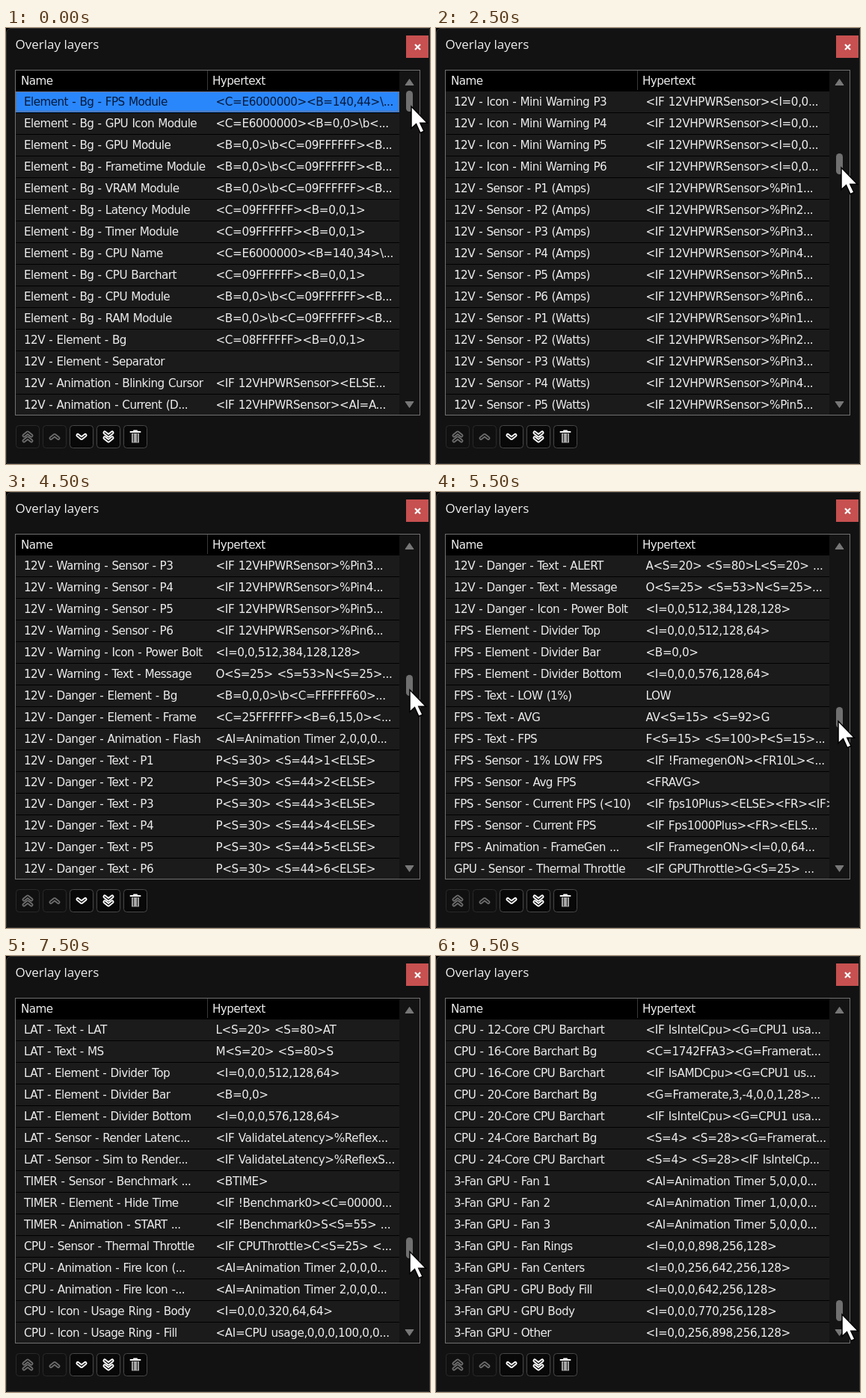
Write an HTML page that moves like this. It is 567 px wide and 584 px high and loops after 10000 ms.

```html
<!DOCTYPE html>
<html lang="en">
<head>
<meta charset="utf-8">
<title>Overlay layers</title>
<style>
html, body { margin: 0; width: 100%; height: 100%; overflow: hidden; background: #000; }
#win { position: absolute; left: 0; top: 0; width: 567px; height: 584px; box-sizing: border-box; overflow: hidden;
  background: #121212; border: 1px solid #343434; border-radius: 7px 2px 2px 2px; }
#win > * { margin: -1px 0 0 -1px; }
#win div, svg { position: absolute; }
#title { left: 12.5px; top: 7px; font: 17px/30px "Open Sans", sans-serif; color: #eee; }
#list { left: 12px; top: 56px; width: 540px; height: 461px; border: 1px solid #707070; background: #000; overflow: hidden;
  font: 15.2px/29px "DejaVu Sans", sans-serif; letter-spacing: -.56px; word-spacing: 1px; color: #ececec; white-space: pre; }
.head { top: 0; }
.row { left: 0; width: 513px; height: 28px; background: #1b1b1b; overflow: hidden; }
.row.on { background: #2a87fb; color: #061a3c; }
.row.on::after { content: ""; position: absolute; inset: 0 0 1px; border: 1px dotted #a5602c; }
.row div { top: 0; }
.row div:first-child { left: 11px; }
.row div:last-child { left: 267.5px; letter-spacing: -.38px; }
#bar { left: 513px; top: 0; width: 27px; height: 461px; background: #141414; }
#split { left: 256px; top: 0; width: 1px; height: 26px; background: #3a3a3a; }
svg { left: 0; top: 0; }
</style>
</head>
<body>
<div id="win">
  <div id="title">Overlay layers</div>
  <div id="list">
    <div class="head" style="left:7px">Name</div><div class="head" style="left:263px">Hypertext</div>
    <div id="split"></div><div id="bar"></div>
  </div>
  <svg width="567" height="584" fill="none">
    <path d="M535 10h30v30h-30z" fill="#c75050"/>
    <path d="M547 22l7 7m0-7l-7 7" stroke="#fff" stroke-width="2.2"/>
    <path d="M534 76.500h11l-5.500-8zM534 500.500h11l-5.500 8z" fill="#777" stroke="#777" stroke-linejoin="round"/>
    <rect id="thumb" x="535" width="9" height="28" rx="4.500" fill="#707070"/>
    <g id="buttons"></g>
    <path id="cursor" d="M0 0V29.500L6.500 23.500L12 35.500L17 33.300L11.800 22.200H21.500Z" fill="#fff" stroke="#000" stroke-width="1.500"/>
  </svg>
</div>
<script>
// name|hypertext; "#a-b" repeats a line for a..b and "#" is the current number
const source = String.raw`
Element - Bg - FPS Module|<C=E6000000><B=140,44>\...
Element - Bg - GPU Icon Module|<C=E6000000><B=0,0>\b<...
Element - Bg - GPU Module|<B=0,0>\b<C=09FFFFFF><B...
Element - Bg - Frametime Module|<B=0,0>\b<C=09FFFFFF><B...
Element - Bg - VRAM Module|<B=0,0>\b<C=09FFFFFF><B...
Element - Bg - Latency Module|<C=09FFFFFF><B=0,0,1>
Element - Bg - Timer Module|<C=09FFFFFF><B=0,0,1>
Element - Bg - CPU Name|<C=E6000000><B=140,34>\...
Element - Bg - CPU Barchart|<C=09FFFFFF><B=0,0,1>
Element - Bg - CPU Module|<B=0,0>\b<C=09FFFFFF><B...
Element - Bg - RAM Module|<B=0,0>\b<C=09FFFFFF><B...
12V - Element - Bg|<C=08FFFFFF><B=0,0,1>
12V - Element - Separator|
12V - Animation - Blinking Cursor|<IF 12VHPWRSensor><ELSE...
12V - Animation - Current (D...|<IF 12VHPWRSensor><AI=A...
12V - Icon - Connector Fill|<IF 12VHPWRSensor><I=0,0...
12V - Icon - Connector Body|<IF 12VHPWRSensor><I=0,0...
12V - Icon - Pin #1-6|<IF 12VHPWRSensor><AI=P...
12V - Text - TOTAL|<IF 12VHPWRSensor>T<S=3...
12V - Text - AMPS|<IF 12VHPWRSensor>A<S=3...
12V - Text - P#1-6|<IF 12VHPWRSensor>P<S=3...
12V - Icon - Status Symbol O...|<IF !12VHPWRSensor><I=0,0...
12V - Icon - Status Symbol N...|<IF 12VHPWRSensor><I=0,0...
12V - Icon - Status Symbol ...|<IF 12VHPWRSensor><I=0,0...
12V - Icon - Status Symbol D...|<IF 12VHPWRSensor><I=0,0...
12V - Icon - Mini P#1-6|<IF 12VHPWRSensor><I=0,0...
12V - Icon - Mini Connector Body|<IF 12VHPWRSensor><I=0,0...
12V - Icon - Mini Connector Fill|<IF 12VHPWRSensor><I=0,0...
12V - Icon - Mini Warning P#1-6|<IF 12VHPWRSensor><I=0,0...
12V - Sensor - P#1-6 (Amps)|<IF 12VHPWRSensor>%Pin#...
12V - Sensor - P#1-6 (Watts)|<IF 12VHPWRSensor>%Pin#...
12V - Sensor - Total (Watts)|<IF 12VHPWRSensor>%PinTo...
12V - Sensor - AVG Pin (Amps)|<IF 12VHPWRSensor>%PinA...
12V - Sensor - MIN Pin (Amps)|<IF 12VHPWRSensor>%PinMI...
12V - Sensor - MAX Pin (Amps)|<IF 12VHPWRSensor>%PinM...
12V - Sensor - Pin Balance (%)|<IF 12VHPWRSensor>%PinBa...
12V - Warning - Element - Bg|<B=0,0,0>\b<C=FFFFFF60>...
12V - Warning - Element - D...|<C=25FFFFFF><B=6,15,0><...
12V - Warning - Element - D...|<C=FFFF60><B=12,1><C=0...
12V - Warning - Text - POWE...|P<S=20> <S=70>O<S=20> ...
12V - Warning - Text - IDEAL|I<S=15> <S=52>D<S=15> ...
12V - Warning - Text - / PIN|/ <S=10> <S=52>P<S=20> ...
12V - Warning - Text - P1|P<S=20> <S=44>1
12V - Warning - Text - P2|P<S=30> <S=44>2
12V - Warning - Text - P#3-6|P<S=30> <S=44>#<ELSE>
12V - Warning - Icon - P#1-6|<I=0,0,512,384,128,128>
12V - Warning - Sensor - P#1-6|<IF 12VHPWRSensor>%Pin#...
12V - Warning - Icon - Power Bolt|<I=0,0,512,384,128,128>
12V - Warning - Text - Message|O<S=25> <S=53>N<S=25>...
12V - Danger - Element - Bg|<B=0,0,0>\b<C=FFFFFF60>...
12V - Danger - Element - Frame|<C=25FFFFFF><B=6,15,0><...
12V - Danger - Animation - Flash|<AI=Animation Timer 2,0,0,0...
12V - Danger - Text - P#1-6|P<S=30> <S=44>#<ELSE>
12V - Danger - Sensor - P#1-6|<IF 12VHPWRSensor>%Pin#...
12V - Danger - Text - POWER|P<S=20> <S=70>O<S=20> ...
12V - Danger - Text - / PIN|/ <S=10> <S=52>P<S=20> ...
12V - Danger - Text - ALERT|A<S=20> <S=80>L<S=20> ...
12V - Danger - Text - Message|O<S=25> <S=53>N<S=25>...
12V - Danger - Icon - Power Bolt|<I=0,0,512,384,128,128>
FPS - Element - Divider Top|<I=0,0,0,512,128,64>
FPS - Element - Divider Bar|<B=0,0>
FPS - Element - Divider Bottom|<I=0,0,0,576,128,64>
FPS - Text - LOW (1%)|LOW
FPS - Text - AVG|AV<S=15> <S=92>G
FPS - Text - FPS|F<S=15> <S=100>P<S=15>...
FPS - Sensor - 1% LOW FPS|<IF !FramegenON><FR10L><...
FPS - Sensor - Avg FPS|<FRAVG>
FPS - Sensor - Current FPS (<10)|<IF fps10Plus><ELSE><FR><IF>
FPS - Sensor - Current FPS|<IF Fps1000Plus><FR><ELS...
FPS - Animation - FrameGen ...|<IF FramegenON><I=0,0,64...
GPU - Sensor - Thermal Throttle|<IF GPUThrottle>G<S=25> ...
GPU - Animation - Fire Icon #1-2|<AI=Animation Timer #,0,0,0...
GPU - Text - GPU|G<S=20> <S=80>PU
GPU - Text - TEMP|T<S=20> <S=80>EMP
GPU - Text - CLOCK|C<S=20> <S=80>LOCK
GPU - Icon - Usage Ring - Body|<I=0,0,0,320,64,64>
GPU - Icon - Usage Ring - Fill|<AI=GPU1 usage,0,0,0,100,...
GPU - Icon - Temp Ring - Body|<I=0,0,0,320,64,64>
GPU - Icon - Temp Ring - Fill|<AI=GPU1 temperature,0,0...
GPU - Element - Divider Top|<I=0,0,0,512,128,64>
GPU - Element - Divider Bar|<B=0,0>
GPU - Icon - Speed Gauge - Body|<I=0,0,0,320,64,64>
GPU - Icon - Speed Gauge - Fill|<AI=GPU1 clock,0,0,0,3000,5...
GPU - Sensor - GPU Name|<IF GPUThrottle><ELSE>%G...
GPU - Sensor - Usage (%)|<IF GPUusage100><S=100>...
GPU - Sensor - Power (W)|%GPU1 power% W
GPU - Sensor - Temp (°C)|%GPU1 temperature% <S=13...
GPU - Sensor - Clock (MHz)|%GPU1 clock%  <S=-80>MHZ
FT - Frametime Graph Line (...|<IF !FramegenON><G=Frame...
FT - Frametime Graph Stutter...|<IF !FramegenON><G=Frame...
FT - Frametime Spike Indicat...|<IF !FramegenON><G=Frame...
FT - FrameGen FT Spike Indi...|<IF !FramegenON><G=Frame...
FT - Text - FRAMETIME|F<S=55> <S=100>R<S=55...
FT - Element - Pill Shape - Le...|<I=0,0,0,512,64,128>
FT - Element - Pill Shape - Center|<C=00FF88><B=18,1>\r\n<...
FT - Element - Pill Shape - Ri...|<I=0,0,64,512,64,128>
FT - Element - Pill Shape - Le...|<I=0,0,0,384,64,128>
FT - Element - Pill Shape - Ce...|<C=00FF88><B=18,1>\r\n<...
FT - Element - Pill Shape - Ri...|<I=0,0,64,384,64,128>
FT - Sensor - Frametime (ms)|<FT>
FT - Text - MS|M<S=20> <S=80>S
VRAM - Text - VRAM|V<S=20> <S=80>RAM
VRAM - Sensor - Usage (MB)|%GPU1 memory usage%
LAT - Text - LAT|L<S=20> <S=80>AT
LAT - Text - MS|M<S=20> <S=80>S
LAT - Element - Divider Top|<I=0,0,0,512,128,64>
LAT - Element - Divider Bar|<B=0,0>
LAT - Element - Divider Bottom|<I=0,0,0,576,128,64>
LAT - Sensor - Render Latenc...|<IF ValidateLatency>%Reflex...
LAT - Sensor - Sim to Render...|<IF ValidateLatency>%ReflexS...
TIMER - Sensor - Benchmark ...|<BTIME>
TIMER - Element - Hide Time|<IF !Benchmark0><C=00000...
TIMER - Animation - START ...|<IF !Benchmark0>S<S=55> ...
CPU - Sensor - Thermal Throttle|<IF CPUThrottle>C<S=25> <...
CPU - Animation - Fire Icon (...|<AI=Animation Timer 2,0,0,0...
CPU - Animation - Fire Icon -...|<AI=Animation Timer 2,0,0,0...
CPU - Icon - Usage Ring - Body|<I=0,0,0,320,64,64>
CPU - Icon - Usage Ring - Fill|<AI=CPU usage,0,0,0,100,0,0...
CPU - Icon - Temp Ring - Body|<I=0,0,0,320,64,64>
CPU - Icon - Temp Ring - Fill|<AI=CPU temperature,0,0,0...
CPU - Icon - Speed Gauge - Body|<I=0,0,0,320,64,64>
CPU - Icon - Speed Gauge - Fill|<AI=CPU clock,0,0,0,6000,5...
CPU - Sensor - CPU Name|<IF CPUThrottle><ELSE>%C...
CPU - Sensor - Usage (%)|<IF CPUusage100><S=100>...
CPU - Sensor - Power (W)|%CPU power% W
CPU - Sensor - Temp (°C)|%CPU temperature% <S=13...
CPU - Sensor - Clock (MHz)|%CPU clock%  <S=-80>MHZ
CPU - Text - CPU|C<S=20> <S=80>PU
CPU - Text - TEMP|T<S=20> <S=80>EMP
CPU - Element - Divider Top|<I=0,0,0,512,128,64>
CPU - Element - Divider Bar|<B=0,0>
CPU - Element - Divider Bottom|<I=0,0,0,576,128,64>
RAM - Icon - Usage Ring - Body|<I=0,0,0,320,64,64>
RAM - Icon - Usage Ring - Fill|<AI=RAM usage,0,0,0,100,0...
RAM - Sensor - Usage (GB)|%RAM usage%
RAM - Text - RAM|R<S=20> <S=80>AM
RAM - Element - Divider Top|<I=0,0,0,512,128,64>
RAM - Element - Divider Bar|<B=0,0>
RAM - Element - Divider Bottom|<I=0,0,0,576,128,64>
CPU - 4-Core Barchart Bg|<C=1742FFA3><G=Framerat...
CPU - 4-Core CPU Barchart|<IF IsIntelCpu><G=CPU1 usa...
CPU - 6-Core Barchart Bg|<C=1742FFA3><G=Framerat...
CPU - 6-Core CPU Barchart|<IF IsIntelCpu><G=CPU1 usa...
CPU - 8-Core Barchart Bg|<C=1742FFA3><G=Framerat...
CPU - 8-Core CPU Barchart|<IF IsAMDCpu><G=CPU1 us...
CPU - 10-Core Barchart Bg|<C=1742FFA3><G=Framerat...
CPU - 10-Core CPU Barchart|<IF IsIntelCpu><G=CPU1 usa...
CPU - 12-Core Barchart Bg|<C=1742FFA3><G=Framerat...
CPU - 12-Core CPU Barchart|<IF IsIntelCpu><G=CPU1 usa...
CPU - 16-Core Barchart Bg|<C=1742FFA3><G=Framerat...
CPU - 16-Core CPU Barchart|<IF IsAMDCpu><G=CPU1 us...
CPU - 20-Core Barchart Bg|<G=Framerate,3,-4,0,0,1,28>...
CPU - 20-Core CPU Barchart|<IF IsIntelCpu><G=CPU1 usa...
CPU - 24-Core Barchart Bg|<S=4> <S=28><G=Framerat...
CPU - 24-Core CPU Barchart|<S=4> <S=28><IF IsIntelCp...
3-Fan GPU - Fan 1|<AI=Animation Timer 5,0,0,0...
3-Fan GPU - Fan 2|<AI=Animation Timer 1,0,0,0...
3-Fan GPU - Fan 3|<AI=Animation Timer 5,0,0,0...
3-Fan GPU - Fan Rings|<I=0,0,0,898,256,128>
3-Fan GPU - Fan Centers|<I=0,0,256,642,256,128>
3-Fan GPU - GPU Body Fill|<I=0,0,0,642,256,128>
3-Fan GPU - GPU Body|<I=0,0,0,770,256,128>
3-Fan GPU - Other|<I=0,0,256,898,256,128>`;

const layers = source.trim().split("\n").flatMap(line => {
  const range = line.match(/#(\d)-(\d)/);
  if (!range) return [line];
  const [all, from, to] = range, out = [];
  for (let n = +from; n <= +to; n++) out.push(line.replace(all, n).replace("#", n));
  return out;
}).map(line => line.split("|"));

// time, first row, thumb top, cursor x, cursor y
const keys = [
  [0, 0, 84, 542, 104], [1000, 18, 117, 542, 136], [1500, 27, 134, 540, 152],
  [2000, 36, 151, 542, 169], [3000, 54, 184, 542, 203], [3500, 63, 201, 540, 221],
  [4500, 86, 245, 540, 264], [5000, 98, 267, 538, 285], [5500, 109, 288, 538, 306],
  [6500, 136, 338, 538, 356], [7500, 157, 377, 540, 395], [8000, 168, 398, 540, 416],
  [8500, 179, 419, 543, 437], [9500, 202, 461, 543, 479]
];
const $ = id => document.getElementById(id);

const rows = Array.from({ length: 15 }, (_, i) => {
  const row = document.createElement("div");
  row.className = "row";
  row.style.top = 28 + i * 29 + "px";
  row.append(document.createElement("div"), document.createElement("div"));
  $("list").append(row);
  return row;
});

// chevrons are thick strokes with a dark core
const chevrons = (x, dir, ...ys) => {
  const d = ys.map(y => `M${x - 5} ${y + 2 * dir}l5 ${-4 * dir}l5 ${4 * dir}`).join("");
  return `<path d="${d}" stroke-width="5"/><path d="${d}" stroke="#0a0a0a" stroke-width="1.300"/>`;
};
const icons = [
  x => chevrons(x, 1, 544, 551),
  x => chevrons(x, 1, 547.5),
  x => chevrons(x, -1, 547.5),
  x => chevrons(x, -1, 544, 551),
  x => `<path d="M${x - 6.5} 541h13M${x - 2} 539.500h4" stroke-width="2"/>
    <path d="M${x - 5} 543h10v12.500h-10z" fill="#aaa" stroke="none"/>
    <path d="M${x - 2.5} 544v10M${x + 2.5} 544v10" stroke="#333" stroke-width="1.300"/>`
];
$("buttons").innerHTML = icons.map((icon, i) => {
  const x = 29 + i * 36, off = i < 2;
  return `<rect x="${x - 15.5}" y="532.500" width="31" height="30" rx="4" fill="${off ? "#101010" : "#080808"}"
    stroke="${off ? "#292929" : "#484848"}"/>
    <g stroke="${off ? "#6c6c6c" : "#fff"}" stroke-linejoin="round" stroke-linecap="round">${icon(x)}</g>`;
}).join("");

function pose(t) {
  const i = Math.max(1, keys.findIndex(k => k[0] >= t));
  const a = keys[i - 1], b = keys[i], f = (t - a[0]) / (b[0] - a[0]);
  return a.map((v, j) => Math.round(v + (b[j] - v) * f));
}

let shown = -1;
function draw(now) {
  const t = Math.floor(now % 10000 / 500) * 500;
  if (t === shown) return;
  shown = t;
  const [, first, thumb, x, y] = pose(t);
  rows.forEach((row, i) => {
    const [name, text] = layers[first + i];
    row.classList.toggle("on", first + i === 0);
    row.firstChild.textContent = name;
    row.lastChild.textContent = text;
  });
  $("thumb").setAttribute("y", thumb);
  $("cursor").setAttribute("transform", `translate(${x} ${y + 1})`);
}
const start = performance.now();
function tick() {
  draw(performance.now() - start);
  requestAnimationFrame(tick);
}
tick();
</script>
</body>
</html>
```
